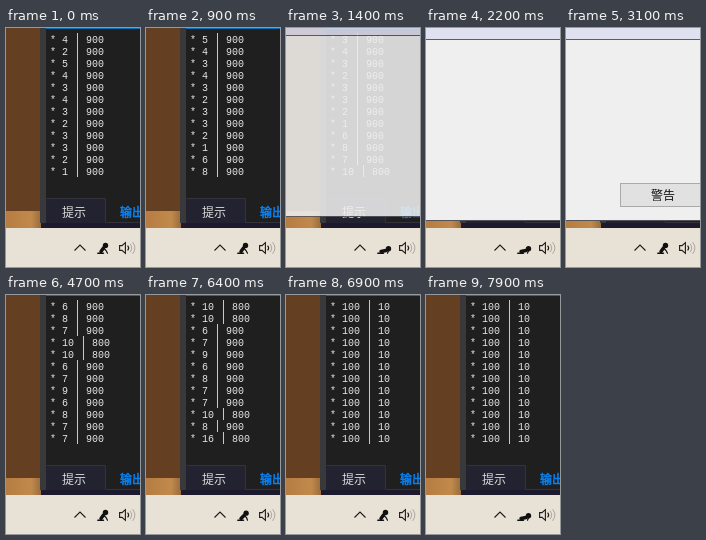
Recreate the animation shown at these times as an HTML page. Size 134 px wide and 239 px high, loop 8000 ms.

```html
<!DOCTYPE html>
<html lang="zh">
<head>
<meta charset="utf-8">
<style>
html, body { margin: 0; width: 100%; height: 100%; overflow: hidden; background: #e8e1d5; }
svg { display: block; width: 100vw; height: 100vh; }
.log { font: 10px "Liberation Mono", monospace; fill: #e6e6e6; white-space: pre; }
.ui { font: 12px "Noto Sans CJK SC", "Noto Sans CJK", sans-serif; }
</style>
</head>
<body>
<svg viewBox="0 0 134 239">
  <defs>
    <linearGradient id="sand">
      <stop offset="0" stop-color="#b67c42"/>
      <stop offset=".7" stop-color="#c18a4c"/>
      <stop offset="1" stop-color="#94683c"/>
    </linearGradient>
  </defs>
  <rect width="35" height="184" fill="#643f21"/>
  <rect y="183" width="36" height="17" fill="url(#sand)"/>
  <rect x="34" width="6" height="195" fill="#39383b"/>
  <rect x="35" y="195" width="99" height="5" fill="#1c1a2c"/>
  <rect x="40" width="94" height="195" fill="#1f1f20"/>
  <rect x="40" width="94" height="1" fill="#0b6fb5"/>
  <path d="M40.5 170.5H99.5V194.5H134" fill="none" stroke="#34333c"/>
  <rect x="40" y="171" width="59" height="24" fill="#232230"/>
  <text class="ui" x="56" y="188.5" fill="#ddd">提示</text>
  <text class="ui" x="114" y="188.5" fill="#0a84f5" stroke="#0a84f5" stroke-width=".5">输出</text>
  <g id="log"></g>
  <g id="win">
    <rect x="-5" y="-10" width="144" height="202" fill="#efefef"/>
    <rect id="head" x="-5" y="-10" width="144" height="21"/>
    <path id="rule" d="M-5 11.5H139"/>
    <path d="M-5 192.5H139" stroke="#55535a"/>
    <g id="button">
      <rect x="54.5" y="155.5" width="90" height="23" fill="#e1e1e1" stroke="#a9a9a9"/>
      <text class="ui" x="85" y="171.5" fill="#111">警告</text>
    </g>
  </g>
  <rect y="200" width="134" height="39" fill="#e8e1d5"/>
  <g fill="none" stroke="#1a1a1a" stroke-width="1.1">
    <path d="M68.5 222.5L74 217L79.5 222.5"/>
    <path d="M113.6 217.6H116L119.4 214.6V225.4L116 222.4H113.6Z"/>
    <path d="M121.6 217.6Q123.8 220 121.6 222.4"/>
    <path d="M124 215.8Q127.4 220 124 224.2M126.6 214.2Q131.2 220 126.6 225.8" stroke="#a5a09a" stroke-width=".9"/>
  </g>
  <g fill="none" stroke="#111" stroke-linecap="round" stroke-linejoin="round">
    <path d="M91.8 225.3H97.5" stroke-width="1.4"/>
    <path id="torso" stroke-width="3.4"/>
    <path id="arm" stroke-width="1.2"/>
  </g>
  <circle id="face" r="2.7" fill="#111"/>
</svg>
<script>
const LOOP = 8000, ROWS = 12;
const usage = "4 2 5 4 3 4 3 2 3 3 2 1 6 8 7 10 10 6 7 9 6 8 7 7 10 8 16".split(" ");
const dips = [1400, 2200, 5800, 6600, 7200, 7900];

const $ = id => document.getElementById(id);
const set = (el, attrs) => { for (const k in attrs) el.setAttribute(k, attrs[k]); };
const make = (tag, attrs) => {
  const el = document.createElementNS("http://www.w3.org/2000/svg", tag);
  set(el, attrs);
  return $("log").appendChild(el);
};
const clamp = v => Math.max(0, Math.min(1, v));
const delay = n => n >= 100 ? 10 : n >= 10 ? 800 : 900;

const rows = Array.from({ length: ROWS }, (_, i) => {
  const y = 15 + i * 12;
  make("text", { class: "log", x: 44, y }).textContent = "*";
  return {
    y,
    load: make("text", { class: "log", x: 56, y }),
    bar: make("path", { stroke: "#c8c8c8" }),
    wait: make("text", { class: "log", y })
  };
});

// steady lines, slower ones after the window closes, then a burst
function scrolled(t) {
  const early = Math.min(12, Math.floor(t / 350));
  const late = Math.max(0, Math.min(3, Math.floor((t - 4300) / 700)));
  return early + late + Math.ceil(12 * clamp((t - 6400) / 500));
}

function drawLog(t) {
  const first = scrolled(t);
  rows.forEach((row, i) => {
    const n = usage[first + i] ?? "100", w = n.length * 6;
    row.load.textContent = n;
    row.wait.textContent = delay(+n);
    set(row.wait, { x: 74 + w });
    set(row.bar, { d: `M${65.5 + w} ${row.y - 10}v12` });
  });
}

function drawWindow(t) {
  const open = clamp((t - 1250) / 300), close = clamp((4700 - t) / 200);
  const idle = t >= 4400;
  set($("win"), {
    opacity: (1 - (1 - open) ** 3) * close,
    transform: `translate(0 ${-8 * (1 - open * close)})`
  });
  set($("head"), { fill: idle ? "#e0e0e0" : "#dfe0f0" });
  set($("rule"), { stroke: idle ? "#a0a0a0" : "#5c5b66" });
  set($("button"), { visibility: t >= 2800 ? "visible" : "hidden" });
}

// the figure sits up except close to each dip
function drawFigure(t) {
  const up = clamp(Math.min(...dips.map(d => Math.abs(t - d))) / 250);
  const x = 100 - 2.5 * up, y = 222.5 - 2.5 * up;
  set($("torso"), { d: `M95 223.5L${x} ${y}` });
  set($("arm"), { d: `M${x} ${y}L${x + 2.5} 222.5L101.5 225.2` });
  set($("face"), { cx: 102.5 - 3 * up, cy: 220.8 - 3.3 * up });
}

function draw(ms) {
  const t = Math.floor(ms % LOOP / 100) * 100;
  drawLog(t);
  drawWindow(t);
  drawFigure(t);
}

const start = performance.now();
function tick() {
  draw(performance.now() - start);
  requestAnimationFrame(tick);
}
tick();
</script>
</body>
</html>
```
